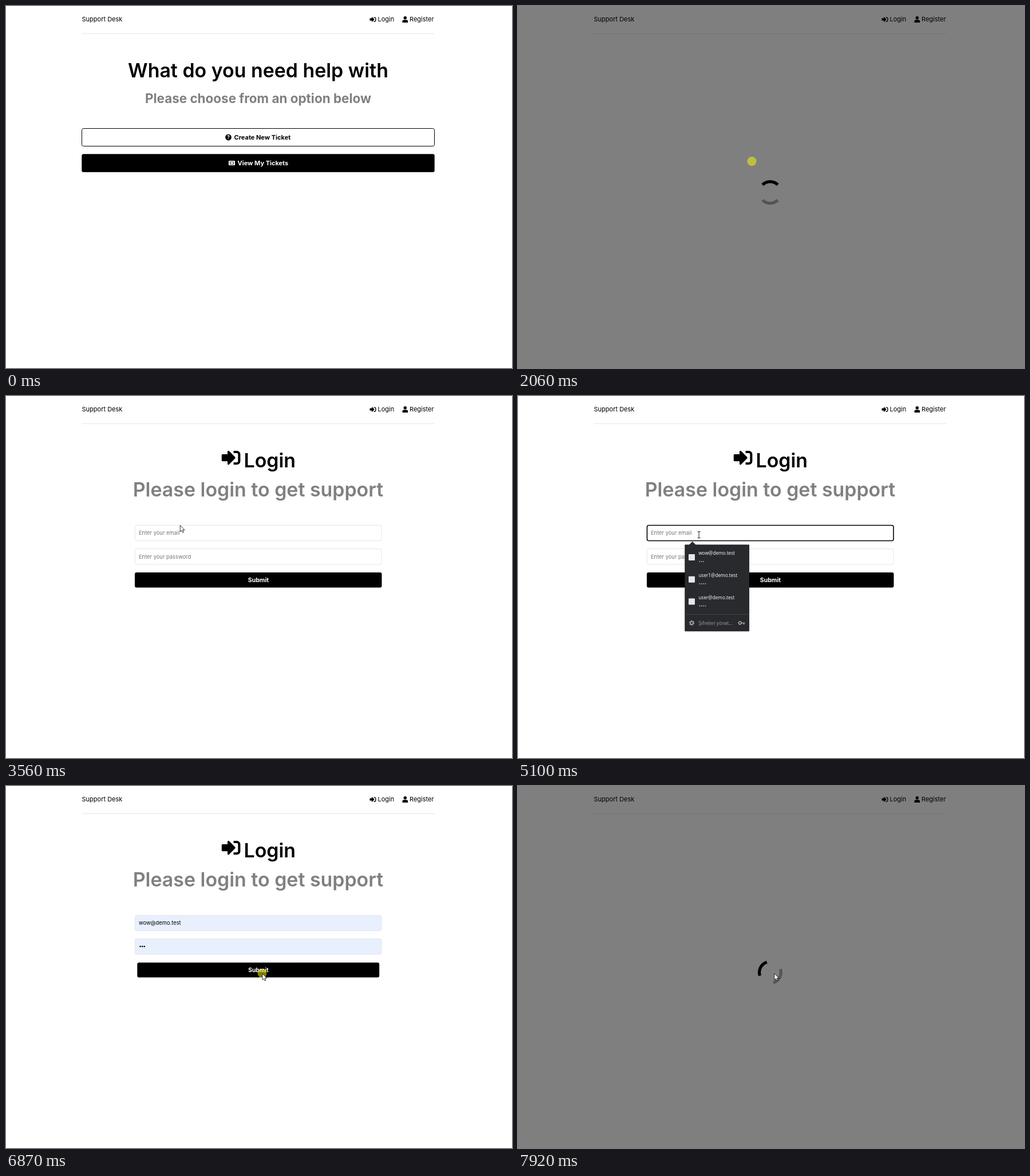
Animation of 884 by 634 pixels, one loop 7.99 s. Source, as an HTML page:

```html
<!DOCTYPE html>
<html lang="en">
<head>
<meta charset="utf-8">
<title>Support Desk</title>
<style>
  html, body { margin: 0; width: 100%; height: 100%; overflow: hidden; background: #fff; }
  svg { display: block; }
  text { font-family: Inter, "Open Sans", sans-serif; font-size: 11px; }
  .mid { text-anchor: middle; }
  .title { font-size: 33.9px; font-weight: 600; }
  .subtitle { font-size: 22.45px; font-weight: 700; }
  .bold { font-weight: 700; }
  .gray { fill: #808080; }
  .white { fill: #fff; }
  .field { font-size: 9.35px; }
  .hint { fill: #757575; }
  .popup text { font-family: "Open Sans", "Noto Sans", sans-serif; font-size: 8.2px; fill: #fff; }
  .popup .muted { fill: #9aa0a6; }
  .line { fill: none; stroke: #9aa0a6; stroke-width: 1.7; }
</style>
</head>
<body>
<svg width="884" height="634" viewBox="0 0 884 634">
  <defs>
    <g id="enter">
      <path d="M326 96h90a64 64 0 0 1 64 64v192a64 64 0 0 1-64 64h-90" fill="none" stroke="#000" stroke-width="64"/>
      <path d="M24 184H184V88L352 256 184 424V328H24Z" stroke="#000" stroke-width="48" stroke-linejoin="round"/>
    </g>
    <g id="person">
      <circle cx="224" cy="128" r="128"/>
      <path d="M0 512V422a134 134 0 0 1 134-134h180a134 134 0 0 1 134 134v90z"/>
    </g>
  </defs>

  <rect width="884" height="634" fill="#fff"/>
  <text x="132.500" y="27">Support Desk</text>
  <use href="#enter" transform="translate(635.500 18) scale(.0215)"/>
  <text x="649.500" y="27">Login</text>
  <use href="#person" transform="translate(692.500 18) scale(.0215)"/>
  <text x="705" y="27">Register</text>
  <path d="M132.500 48.500H748.500" stroke="#e6e6e6"/>

  <g id="home">
    <text class="mid title" x="440.500" y="124.500">What do you need help with</text>
    <text class="mid subtitle gray" x="440.500" y="170">Please choose from an option below</text>
    <rect x="132.500" y="214.500" width="616" height="31" rx="3" fill="#fff" stroke="#000"/>
    <circle cx="388.500" cy="230" r="5.400"/>
    <text class="mid bold white" x="388.500" y="233.200" style="font-size:9px">?</text>
    <text class="bold" x="398.500" y="234">Create New Ticket</text>
    <g id="view">
      <rect x="132.300" y="259.300" width="616.400" height="31.700" rx="3"/>
      <rect class="white" x="389" y="271" width="11" height="8" rx="1"/>
      <rect x="391.500" y="273" width="6" height="4" fill="none" stroke="#000" stroke-width=".8"/>
      <text class="bold white" x="404.500" y="279">View My Tickets</text>
    </g>
  </g>

  <g id="login">
    <use href="#enter" transform="translate(376.800 91.800) scale(.0637)"/>
    <text class="title" x="415.500" y="124.500">Login</text>
    <text class="mid title gray" x="440.500" y="176">Please login to get support</text>
    <rect id="email" x="225.500" y="226.500" width="430.500" height="27" rx="3"/>
    <rect id="pass" x="225.500" y="267.500" width="430.500" height="27.500" rx="3" stroke="#e6e6e6"/>
    <g id="hints" class="hint">
      <text class="field" x="232" y="243">Enter your email</text>
      <text class="field" x="232" y="284.500">Enter your password</text>
    </g>
    <g id="filled">
      <text class="field" x="232" y="243">wow@demo.test</text>
      <g id="secret"></g>
    </g>
    <g id="submit">
      <rect x="225" y="309" width="431.500" height="26.500" rx="3"/>
      <text class="mid bold white" x="441" y="326" style="font-size:10.5px">Submit</text>
    </g>
    <g id="popup" class="popup">
      <rect x="291" y="261.500" width="113.500" height="152" rx="1" opacity=".15"/>
      <path d="M298.500 261l6.300-6.200 6.200 6.200z" fill="#292a2d"/>
      <rect x="291.300" y="260.300" width="112.700" height="151.700" rx="1" fill="#292a2d"/>
      <rect id="hover" x="291.300" y="262" width="112.700" height="38.500" fill="#44464a"/>
      <g id="accounts"></g>
      <path d="M291.300 382.500H404" stroke="#3f4145"/>
      <circle class="line" cx="303.500" cy="397.500" r="2.600"/>
      <circle class="line" cx="303.500" cy="397.500" r="3.800" stroke-dasharray="2 1.980"/>
      <text class="muted" x="315.500" y="400.500">Şifreleri yönet...</text>
      <circle class="line" cx="387.800" cy="397.500" r="2.300"/>
      <path class="line" d="M390 397.500h6.500M394.500 397.500v3"/>
    </g>
  </g>

  <g id="loading">
    <rect width="884" height="634" opacity=".5"/>
    <g id="spinner" fill="none" stroke-width="5.200">
      <path d="M427.140 313.140a18.900 18.900 0 0 1 26.720 0" stroke="#000"/>
      <path d="M427.140 339.860a18.900 18.900 0 0 0 26.720 0" stroke="#555"/>
    </g>
  </g>

  <g id="pointer">
    <circle id="click" r="8" fill="#ff0" opacity=".5"/>
    <path id="arrow" d="M.4.400V11.600L3 9.300 4.700 13 6.600 12.200 4.900 8.500H8.300Z" fill="#fff" stroke="#000" stroke-width=".8"/>
    <path id="hand" d="M-1.200 2Q0 .5 1.200 2V6L6.400 8V15H-.8L-3.500 9.500-1.200 9Z" fill="#fff" stroke="#000" stroke-width=".7" stroke-linejoin="round"/>
    <path id="beam" d="M-2.500-5.500h5M0-5.500v11M-2.500 5.500h5" fill="none" stroke="#222"/>
  </g>
</svg>
<script>
const LOOP = 7990;
const LOADING = 2060, LOGIN = 2130, FOCUS = 4570, PREVIEW = 5350, PICK = 5910, CLOSED = 6060, SUBMIT = 6810, SENT = 6930;
const CLICKS = [1930, FOCUS, PICK - 50, SUBMIT];
const CLICK_LENGTH = 150;
const ENTRY = { x: 848, y: 614 };

// Pointer moves, each easing out towards its goal
const moves = [
  { from: 280, to: 1320, x: 408.5, y: 272 },
  { from: 2390, to: 3150, x: 455, y: 190 },
  { from: 3220, to: 3560, x: 304, y: 226 },
  { from: 3560, to: 3900, x: 275, y: 243 },
  { from: 4100, to: 4170, x: 301, y: 243 },
  { from: 5030, to: 5100, x: 316, y: 243 },
  { from: 5100, to: 5860, x: 342, y: 278 },
  { from: 6190, to: 6540, x: 447.5, y: 328 }
];

const $ = id => document.getElementById(id);
const show = (id, on) => { $(id).style.display = on ? '' : 'none'; };
const within = (t, from, to) => t >= from && t < to;
const clamp = v => Math.min(1, Math.max(0, v));
const easeOut = u => 1 - (1 - u) ** 2;

function pointerAt(t) {
  return moves.reduce((p, m) => {
    const k = easeOut(clamp((t - m.from) / (m.to - m.from)));
    return { x: p.x + (m.x - p.x) * k, y: p.y + (m.y - p.y) * k };
  }, ENTRY);
}

function over(id, p) {
  const b = $(id).getBBox();
  return within(p.x, b.x, b.x + b.width) && within(p.y, b.y, b.y + b.height);
}

function shrink(id, on) {
  const el = $(id);
  el.style.transformBox = 'fill-box';
  el.style.transformOrigin = 'center';
  el.style.transform = on ? 'scale(.98)' : '';
}

function dots(count, x, y, gap, r) {
  return Array.from({ length: count }, (_, i) => `<circle cx="${x + i * gap}" cy="${y}" r="${r}"/>`).join('');
}

$('secret').innerHTML = dots(3, 234.5, 281, 3.6, 1.3);
$('accounts').innerHTML = ['wow', 'user1', 'user'].map((name, i) => `
  <g transform="translate(0 ${i * 38.8})">
    <rect x="298" y="277" width="11" height="11" rx="1" fill="#e6e5f1"/>
    <text x="315.500" y="278">${name}@demo.test</text>
    <g class="muted">${dots(i ? 4 : 3, 317.2, 290, 3.4, 1.1)}</g>
  </g>`).join('');

function render(t) {
  const p = pointerAt(t);
  const home = t < LOADING;
  const busy = within(t, LOADING, LOGIN) || t >= SENT;
  const focused = within(t, FOCUS, SUBMIT);
  const popup = within(t, FOCUS, CLOSED);
  const filled = t >= PREVIEW;

  show('home', home);
  show('login', !home && !busy);
  show('loading', busy);
  show('popup', popup);
  show('hover', filled);
  show('hints', !filled);
  show('filled', filled);
  $('popup').style.opacity = clamp((CLOSED - t) / (CLOSED - PICK));
  $('email').setAttribute('stroke', focused ? '#000' : '#e6e6e6');
  $('email').setAttribute('stroke-width', focused ? 1.6 : 1);
  for (const id of ['email', 'pass']) $(id).setAttribute('fill', filled ? '#e8f0fe' : '#fff');

  const angle = Math.max(0, t - SENT) / 1200 * 360;
  $('spinner').setAttribute('transform', `rotate(${angle} 440.5 326.5)`);

  const onView = home && over('view', p);
  const onField = !home && !busy && !(popup && over('popup', p) && p.y > 260) && (over('email', p) || over('pass', p));
  shrink('view', onView);
  shrink('submit', !home && !busy && over('submit', p));

  const visible = t >= moves[0].from && !within(t, LOADING, moves[1].from);
  show('hand', visible && onView);
  show('beam', visible && onField);
  show('arrow', visible && !onView && !onField);
  show('click', CLICKS.some(start => within(t, start, start + CLICK_LENGTH)));
  $('pointer').setAttribute('transform', `translate(${p.x} ${p.y})`);
}

const start = performance.now();
function tick() {
  render((performance.now() - start) % LOOP);
  requestAnimationFrame(tick);
}
tick();
</script>
</body>
</html>
```
